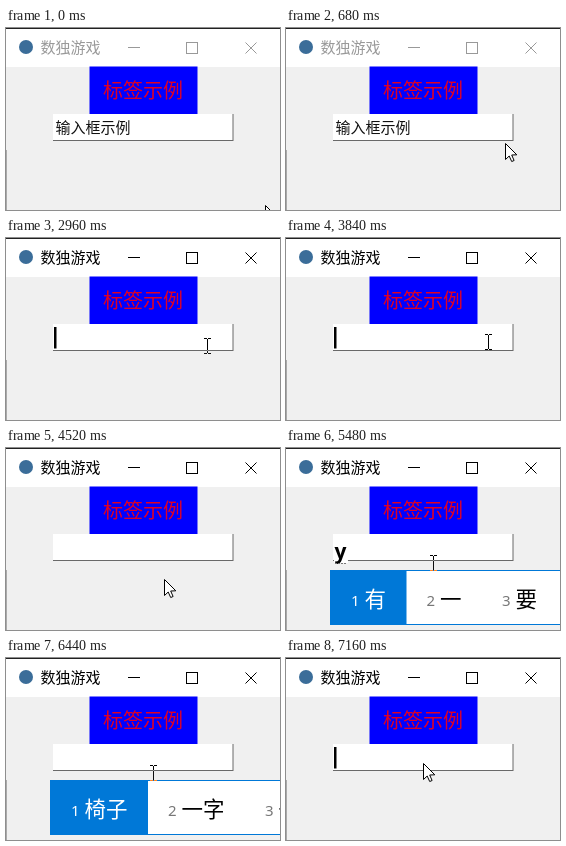
Animation, 274 px wide and 182 px high, one loop 8 s. Source, as an HTML page with a canvas:

```html
<!DOCTYPE html>
<html lang="zh">
<head>
<meta charset="utf-8">
<style>
html, body { margin: 0; width: 100%; height: 100%; overflow: hidden; background: #f0f0f0; }
canvas { display: block; width: 274px; height: 182px; }
</style>
</head>
<body>
<canvas id="stage" width="274" height="182"></canvas>
<script>
const LOOP = 8000;
const CJK = '"Noto Sans CJK SC", "Noto Sans CJK", sans-serif';
const LATIN = '"Noto Sans", "Open Sans", sans-serif';
const ctx = document.getElementById('stage').getContext('2d');

// Pointer path: time, x, y
const path = [
  [120, 259, 177], [280, 248, 133],
  [440, 248, 133], [920, 191, 98],
  [3520, 191, 98], [3720, 202, 53], [4000, 179, 147],
  [4320, 179, 147], [4520, 158, 131], [4960, 137, 105]
];

// Pinyin input: time, letters, candidates
const typing = [
  [5400, 'y', ['有', '一', '要']],
  [5520, 'yi', ['一', '以', '已']],
  [5700, "yi'z", ['一直', '一种', '一']],
  [5840, "yi'zi", ['椅子', '一字', '一']]
];
const deletions = [1880, 2080, 2280, 2480, 2660];
const FOCUS = 1120, CLEAR = 6360, CARET_BACK = 6640, CLOSE = 6800;

function rect(x, y, w, h, color) {
  ctx.fillStyle = color;
  ctx.fillRect(x, y, w, h);
}

function text(str, x, y, size, color, family = CJK, weight = 400) {
  ctx.font = `${weight} ${size}px ${family}`;
  ctx.fillStyle = color;
  ctx.fillText(str, x, y);
}

function pointerAt(t) {
  if (t <= path[0][0]) return path[0].slice(1);
  for (let i = 1; i < path.length; i++) {
    const [t0, x0, y0] = path[i - 1], [t1, x1, y1] = path[i];
    if (t <= t1) {
      const k = (t - t0) / (t1 - t0);
      return [x0 + (x1 - x0) * k, y0 + (y1 - y0) * k];
    }
  }
  return path[path.length - 1].slice(1);
}

function drawTitleBar(active) {
  const color = active ? '#000' : '#999';
  rect(0, 0, 274, 39, '#fff');
  rect(0, 0, 274, 1, '#222');
  ctx.fillStyle = '#3b6d99';
  ctx.beginPath();
  ctx.arc(20, 19, 7, 0, Math.PI * 2);
  ctx.fill();
  text('数独游戏', 34.5, 25, 15, color);
  ctx.strokeStyle = color;
  ctx.lineWidth = 1;
  ctx.strokeRect(180.5, 14.5, 11, 11);
  ctx.beginPath();
  ctx.moveTo(122, 19.5); ctx.lineTo(134, 19.5);
  ctx.moveTo(239.5, 14.5); ctx.lineTo(250.5, 25.5);
  ctx.moveTo(250.5, 14.5); ctx.lineTo(239.5, 25.5);
  ctx.stroke();
}

function drawEntry(t, input) {
  rect(47, 86, 180.5, 27, '#696969');
  rect(47, 86, 179.5, 26, '#fff');
  const left = 5 - deletions.filter(d => t >= d).length;
  text('输入框示例'.slice(0, left), 49.5, 105, 15, '#111');

  const blink = t >= FOCUS && t < 5400 && (t - 1140 + 900) % 900 < 600;
  if (blink || t >= CARET_BACK) {
    rect(48 + 15.2 * left, 89, 2.5, 21.5, '#000');
  }
  if (input && t < CLEAR) drawPreedit(input[1]);
}

// A single letter sits lower, above a dotted line
function drawPreedit(str) {
  const single = str.length === 1;
  ctx.font = `600 21px ${LATIN}`;
  const w = ctx.measureText(str).width;
  rect(48, 89, w + 2, 26, '#fff');
  text(str, 48.5, single ? 111 : 109, 21, '#000', LATIN, 600);
  if (single) for (let x = 49; x < 49 + w; x += 3) rect(x, 115, 2, 1, '#777');
}

function drawCandidates(list) {
  rect(44, 122, 240, 55, '#0078d7');
  rect(45, 123, 240, 53, '#fff');
  let x = 45;
  list.forEach((word, i) => {
    const w = 54 + 21.5 * word.length;
    if (i === 0) rect(x, 123, w, 53, '#0078d7');
    text(i + 1, x + 20, 158, 15, i ? '#777' : '#fff', LATIN, 500);
    text(word, x + 33.5, 158.5, 21.5, i ? '#000' : '#fff');
    x += w;
  });
}

function drawArrow(x, y) {
  ctx.save();
  ctx.translate(Math.round(x) + 0.5, Math.round(y) + 0.5);
  ctx.beginPath();
  [[0, 0], [0, 16], [3.7, 12.5], [6.2, 18], [8.6, 17], [6.2, 11.5], [11.3, 11.3]]
    .forEach(p => ctx.lineTo(...p));
  ctx.closePath();
  ctx.fillStyle = '#fff';
  ctx.fill();
  ctx.strokeStyle = '#000';
  ctx.lineWidth = 1;
  ctx.stroke();
  ctx.restore();
}

// Inverts whatever lies below it
function drawBeam(x, y) {
  x = Math.round(x);
  y = Math.round(y);
  ctx.save();
  ctx.globalCompositeOperation = 'difference';
  rect(x, y - 7, 1, 14, '#fff');
  for (const row of [y - 8, y + 7]) {
    rect(x - 3, row, 3, 1, '#fff');
    rect(x + 1, row, 3, 1, '#fff');
  }
  ctx.restore();
}

function drawPointer(t) {
  const [x, y] = pointerAt(t);
  const overEntry = x >= 47 && x < 228 && y >= 86 && y < 113;
  if (overEntry && t < CLOSE) drawBeam(x + 10, y + 10);
  else drawArrow(x, y);
}

function draw(t) {
  const input = t < CLOSE ? typing.filter(s => t >= s[0]).pop() : null;
  rect(0, 0, 274, 182, '#f0f0f0');
  drawTitleBar(t >= FOCUS);
  rect(0, 122, 1, 60, '#aaa');
  rect(83.5, 38.5, 108, 48, '#00f');
  text('标签示例', 97, 70, 20, '#e00024');
  drawEntry(t, input);
  if (input) drawCandidates(input[2]);
  drawPointer(t);
}

const start = performance.now();
function tick() {
  draw((performance.now() - start) % LOOP);
  requestAnimationFrame(tick);
}
tick();
</script>
</body>
</html>
```
